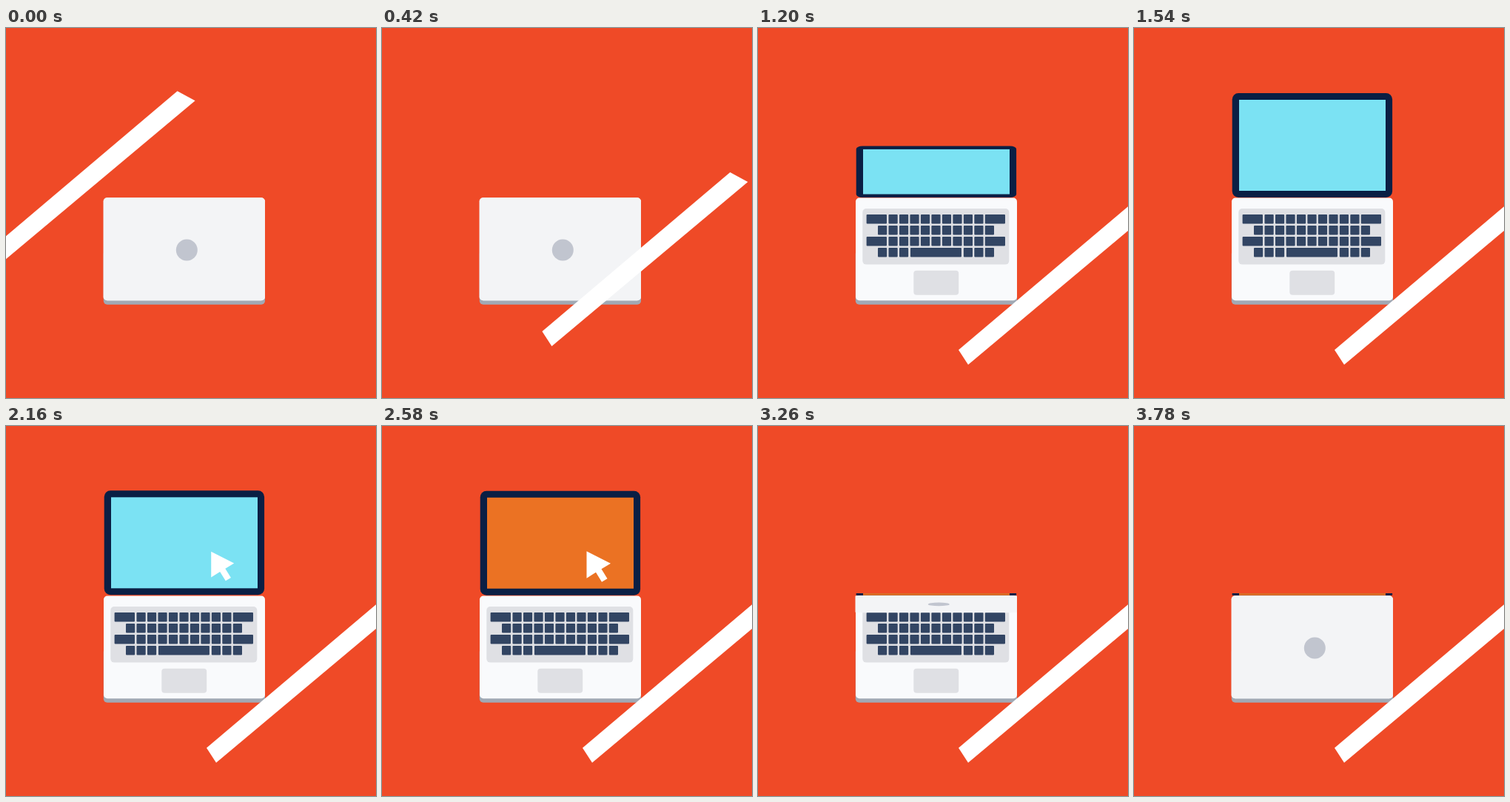
Write an HTML page that moves like this. It is 500 px wide and 500 px high and loops after 4180 ms.

```html
<!DOCTYPE html>
<html lang="en">
<head>
<meta charset="utf-8">
<title>Laptop</title>
<style>
  html, body { margin: 0; width: 100%; height: 100%; overflow: hidden; background: #ef4a27; }
  svg { display: block; width: 100%; height: 100%; }
</style>
</head>
<body>
<svg viewBox="0 0 500 500">
  <g id="screen">
    <rect x="132.7" y="88" width="216.4" height="141" rx="8.5" fill="#0a1f44"/>
    <rect id="display" x="142" y="97" width="198" height="123"/>
    <path id="cursor" fill="#fff" d="M276.5 169.5 309 186 296.5 193.5 304.5 206.5 297 211 289 198 276.5 206Z"/>
  </g>
  <rect x="131.8" y="300" width="218.2" height="73.7" rx="5" fill="#a1a9b4"/>
  <rect x="132" y="229.5" width="218" height="138.7" rx="5" fill="#f9fafc"/>
  <g fill="#dfe0e4">
    <rect x="141.3" y="244" width="198" height="75.6" rx="5"/>
    <rect x="210.3" y="327.8" width="60.9" height="33" rx="4"/>
  </g>
  <path id="keys" fill="#324563" stroke="#324563" stroke-width="2" stroke-linejoin="round"/>
  <g id="lid">
    <rect x="131.5" y="229.3" width="218.5" height="139" rx="5" fill="#f3f4f6"/>
    <circle cx="244.3" cy="300" r="14.5" fill="#c1c5cf"/>
  </g>
  <path id="bar" fill="#fff" d="M525 220 549 233 284 455 271 435Z"/>
</svg>
<script>
const LOOP = 4180, HINGE = 229;
const $ = id => document.getElementById(id);
const [screen, display, cursor, keys, lid, bar] =
  ['screen', 'display', 'cursor', 'keys', 'lid', 'bar'].map($);

// Keyboard: eleven columns, wide outer keys on rows 0 and 2, a space bar on row 3
const key = (x, y, w = 12.2) => `M${x + 1} ${y + 1}h${w - 2}v10.6h${2 - w}z`;
let d = '';
for (let row = 0; row < 4; row++) {
  const y = 252 + row * 15, wide = row % 2 === 0;
  for (let col = 0; col < 11; col++) {
    const x = 162 + col * 14.48;
    if (wide && col === 0) d += key(146.6, y, 27.4);
    else if (wide && col === 10) d += key(x, y, 27.2);
    else if (row === 3 && col === 3) d += key(x + .5, y, 69);
    else if (row < 3 || col < 3 || col > 7) d += key(x, y);
  }
}
keys.setAttribute('d', d);

const span = (t, a, b) => Math.min(1, Math.max(0, (t - a) / (b - a)));
const easeIn = p => p * p;
const easeOut = p => 1 - (1 - p) ** 2;
const smooth = p => p * p * (3 - 2 * p);
const mix = (a, b, p) => a + (b - a) * p;
const set = (el, value) => el.setAttribute('transform', value);
const fold = (el, s, dy = 0) => {
  el.style.display = s > .001 ? '' : 'none';
  set(el, `translate(0 ${HINGE + dy}) scale(1 ${s}) translate(0 ${-HINGE})`);
};

function draw(t) {
  const slide = span(t, 0, 517) - 1;
  set(bar, `translate(${294 * slide} ${135 * slide})`);

  fold(lid, t < 2000 ? 1 - easeIn(span(t, 580, 960)) : easeOut(span(t, 3240, 3480)));

  const open = easeOut(span(t, 1080, 1500));
  const shut = easeIn(span(t, 2960, 3260));
  const lift = smooth(span(t, 1560, 2100)) - smooth(span(t, 2300, 2800));
  fold(screen, open * mix(1, .022, shut), -.7 * lift);

  const hue = smooth(span(t, 2200, 2420));
  const rgb = [[123, 226, 243], [235, 114, 35]];
  display.setAttribute('fill', `rgb(${rgb[0].map((c, i) => mix(c, rgb[1][i], hue))})`);

  const pop = smooth(span(t, 1640, 1860)) - smooth(span(t, 2920, 3060));
  const press = smooth(span(t, 2080, 2240)) - smooth(span(t, 2240, 2400));
  const size = pop * (1 - .09 * press);
  set(cursor, `translate(292.5 190) scale(${size}) translate(-292.5 -190)`);
}

function tick() {
  draw(performance.now() % LOOP);
  requestAnimationFrame(tick);
}
tick();
</script>
</body>
</html>
```
